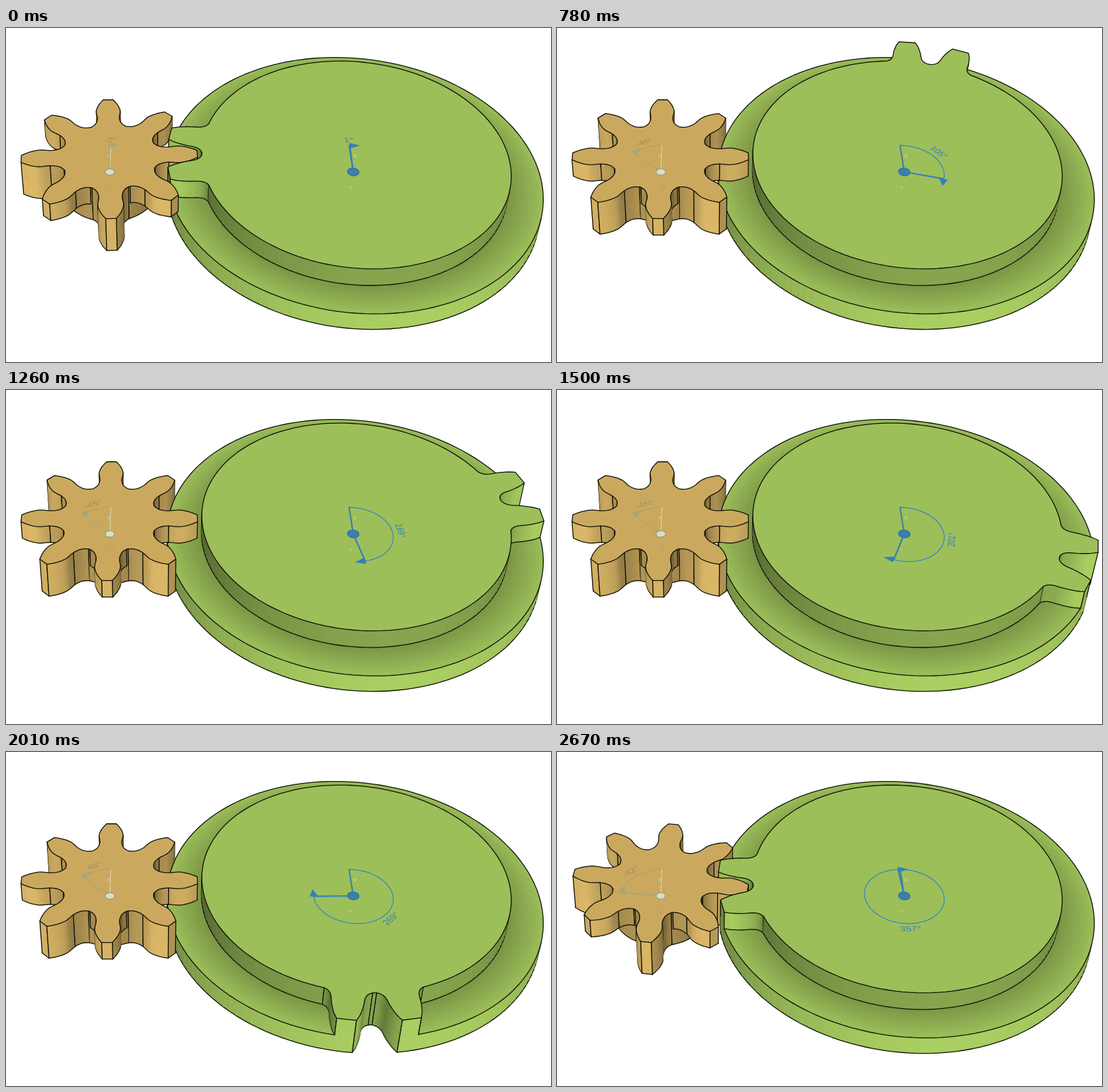
Animation, 824 px wide and 506 px high, one loop 2.7 s. Source, as an HTML page with a canvas:

```html
<!DOCTYPE html>
<html lang="en">
<head>
<meta charset="utf-8">
<title>Intermittent gear</title>
<style>
  html, body { margin: 0; width: 100%; height: 100%; overflow: hidden; background: #fff; }
  canvas { display: block; }
</style>
</head>
<body>
<canvas id="stage" width="824" height="506"></canvas>
<script>
const ctx = document.getElementById('stage').getContext('2d');
const RAD = Math.PI / 180;
const STEP = 30, STEPS = 90;
const BOTTOM = -31.5, LEDGE = -1.5, TOP = 30;   // heights of the two gear layers
const DISC = 229.5, RIM = 281.5, ROOT = 72.5;
const PINION_X = -71, WHEEL_X = 297;
const TAN = [202, 169, 95], GREEN = [157, 191, 90];
const INK = '#0b0d06';

// Perspective camera looking down; x right, y away, z up.
function project(x, y, z) {
  const w = 1 + 0.00036 * y - 0.00032 * z;
  return [228 + x / w, 218 - (0.683 * y + 0.78 * z) / w];
}

// Tooth flanks from tip to root: [degrees from tooth centre, radius, sharp edge]
const WHEEL_FLANK = [[2.7, RIM, 1], [3.6, 273], [4.35, 263], [5, 252], [5.4, 243],
  [6, 236.5], [7, 232], [8.3, DISC, 1]];
const PINION_FLANK = [[3.3, 132, 1], [6.2, 123], [8.6, 114], [10.1, 106], [10.5, 98],
  [10.8, 90, 1], [12.8, 81.5], [16.4, 75.5], [21.5, ROOT, 1]];

// Catmull-Rom subdivision
function smooth(points, n = 3) {
  const out = [];
  for (let i = 0; i < points.length - 1; i++) {
    const [p0, p1, p2, p3] = [-1, 0, 1, 2].map(k => points[Math.min(points.length - 1, Math.max(0, i + k))]);
    for (let j = 0; j < n; j++) {
      const t = j / n;
      const at = k => p1[k] + 0.5 * t * (p2[k] - p0[k] +
        t * (2 * p0[k] - 5 * p1[k] + 4 * p2[k] - p3[k] + t * (3 * (p1[k] - p2[k]) + p3[k] - p0[k])));
      out.push([at(0), at(1), j === 0 && p1[2]]);
    }
  }
  out.push(points[points.length - 1]);
  return out;
}

// "line" marks vertices whose wall has a visible lower edge on the upper layer.
function flank(points, centre, side, line) {
  const list = smooth(points).map(([a, r, edge]) => ({ a: centre + side * a, r, edge, line }));
  return side < 0 ? list.reverse() : list;
}

function arc(r, from, to, line) {
  const n = Math.ceil((to - from) / 2.5);
  return Array.from({ length: n + 1 }, (_, i) => ({ a: from + (to - from) * i / n, r, line }));
}

function tooth(points, centre, line) {
  return [...flank(points, centre, -1, line), ...flank(points, centre, 1, line)];
}

const pinionTop = [], pinionBase = [];
for (let k = 0; k < 4; k++) {
  const thick = tooth(PINION_FLANK, k * 90, false);
  pinionTop.push(...thick, ...tooth(PINION_FLANK, k * 90 + 45, true));
  pinionBase.push(...thick, ...arc(ROOT, k * 90 + 22, k * 90 + 68));
}
const notch = [...flank(WHEEL_FLANK, -9, 1), ...flank(WHEEL_FLANK, 9, -1)];
const wheelTop = [...notch, ...flank(WHEEL_FLANK, 9, 1, true),
  ...arc(DISC, 17.5, 342.5, true), ...flank(WHEEL_FLANK, 351, -1, true)];
const wheelBase = [...notch, ...arc(RIM, 6.4, 353.6)];
const rimLine = arc(RIM, 11.7, 348.3);

function place(verts, x, turn) {
  return verts.map(v => ({
    ...v,
    x: x + v.r * Math.cos((v.a + turn) * RAD),
    y: v.r * Math.sin((v.a + turn) * RAD)
  }));
}

function trace(points, close) {
  ctx.beginPath();
  points.forEach(p => ctx.lineTo(...p));
  if (close) ctx.closePath();
}

function strokeLine(points, color = INK, width = 1.3) {
  trace(points);
  ctx.strokeStyle = color;
  ctx.lineWidth = width;
  ctx.stroke();
}

const rgb = (color, k) => `rgb(${color.map(c => Math.round(c * k))})`;

function wallsOf(solid, low, high) {
  const { verts, color, light, root } = solid;
  const walls = verts.map((a, i) => {
    const b = verts[(i + 1) % verts.length];
    const quad = [project(a.x, a.y, high), project(b.x, b.y, high), project(b.x, b.y, low), project(a.x, a.y, low)];
    const [p, q, , s] = quad;
    const facing = (q[0] - p[0]) * (s[1] - p[1]) - (q[1] - p[1]) * (s[0] - p[0]) > 0;
    const dx = b.x - a.x, dy = b.y - a.y;
    const lit = Math.max(0, (dy * light[0] - dx * light[1]) / (Math.hypot(dx, dy) || 1));
    const depth = Math.min(1, Math.max(0, ((a.r + b.r) / 2 - root) / 40));
    return { a, b, quad, facing, y: (a.y + b.y) / 2,
      fill: rgb(color, (0.68 + 0.4 * lit) * (0.8 + 0.2 * depth)) };
  });
  walls.forEach((w, i) => {
    w.startEdge = w.a.edge || !walls[(i || walls.length) - 1].facing;
    w.endEdge = w.b.edge || !walls[(i + 1) % walls.length].facing;
    w.lowEdge = low === BOTTOM || (w.a.line && w.b.line);
  });
  return walls.filter(w => w.facing);
}

function paintWalls(solids, low, high) {
  const walls = solids.flatMap(s => wallsOf(s, low, high)).sort((a, b) => b.y - a.y);
  for (const { quad, fill, startEdge, endEdge, lowEdge } of walls) {
    const [p, q, r, s] = quad;
    trace(quad, true);
    ctx.fillStyle = ctx.strokeStyle = fill;
    ctx.lineWidth = 0.7;
    ctx.fill();
    ctx.stroke();
    if (lowEdge) strokeLine([s, r]);
    if (startEdge) strokeLine([p, s]);
    if (endEdge) strokeLine([q, r]);
  }
}

function paintCap({ verts, color }, z, tone = 1) {
  trace(verts.map(v => project(v.x, v.y, z)), true);
  ctx.fillStyle = rgb(color, tone);
  ctx.fill();
}

const circle = (x, r, from = 0, to = 360) =>
  place(arc(r, from, to), x, 0).map(v => project(v.x, v.y, 0));

// Soft contact shadow on the rim around the raised disc
function shadeRim() {
  ctx.save();
  ctx.clip();
  ctx.fillStyle = 'rgba(20,30,0,.025)';
  for (let r = 235; r < 278; r += 5) {
    trace(circle(WHEEL_X, r), true);
    ctx.fill();
  }
  ctx.restore();
}

function dot(x, y, color) {
  ctx.beginPath();
  ctx.arc(x, y, 3.6, 0, 7);
  ctx.fillStyle = color;
  ctx.fill();
  ctx.strokeStyle = 'rgba(120,140,70,.25)';
  ctx.lineWidth = 1;
  ctx.stroke();
}

// Joint gauge: fixed pole, swept arc, flag and angle; "angle" is clockwise.
function gauge(x, angle, style) {
  const heading = 90 - angle;
  const at = (r, deg, side = 0) => project(
    x + r * Math.cos(deg * RAD) + side * Math.sin(deg * RAD),
    r * Math.sin(deg * RAD) - side * Math.cos(deg * RAD), 0);
  strokeLine(circle(x, 60, Math.min(90, heading), Math.max(90, heading)), style.arc, 1.2);
  strokeLine([at(0, 0), at(60, 90)], style.pole, style.poleWidth);
  strokeLine([at(0, 0), at(60, heading)], style.flag, style.flagWidth);
  trace([at(53, heading), at(66, heading), at(60, heading, 16)], true);
  ctx.fillStyle = style.flag;
  ctx.fill();

  trace(circle(x, style.hubSize), true);
  ctx.fillStyle = style.hub;
  ctx.fill();
  ctx.strokeStyle = style.hubLine;
  ctx.lineWidth = 1.5;
  ctx.stroke();

  const mid = 90 - angle / 2;
  const flip = Math.sin(mid * RAD) < 0 ? -1 : 1;
  const o = at(72, mid), right = at(72, mid, flip), down = at(72 - flip, mid);
  ctx.save();
  ctx.setTransform(right[0] - o[0], right[1] - o[1], down[0] - o[0], down[1] - o[1], o[0], o[1]);
  ctx.font = '15px "Liberation Sans", Arial, sans-serif';
  ctx.textAlign = 'center';
  ctx.textBaseline = 'middle';
  ctx.fillStyle = style.text;
  ctx.fillText(Math.round(angle) + '°', 0, 0);
  ctx.restore();
}

const BLUE = { arc: '#2a82c8', pole: '#3a7ba4', poleWidth: 2, flag: '#347fb9', flagWidth: 2.2,
  hub: '#3d7fa8', hubLine: '#2f76ae', hubSize: 8.5, text: '#2f80b8' };
const PALE = { arc: 'rgba(130,145,110,.35)', pole: 'rgba(232,222,185,.8)', poleWidth: 1.1,
  flag: 'rgba(145,165,140,.6)', flagWidth: 1.6,
  hub: '#dfdcc4', hubLine: 'rgba(135,155,135,.75)', hubSize: 7, text: 'rgba(115,120,85,.55)' };

function pinionAngle(turn) {
  if (turn < 18) return 2.5 * turn;
  return turn > 342 ? 90 - 2.5 * (360 - turn) : 45;
}

function draw(now) {
  const turn = 1 + 4 * (Math.floor(now / STEP) % STEPS);
  const spin = pinionAngle(turn), wheelSpin = 179.5 - turn;
  const pinion = verts => ({ verts: place(verts, PINION_X, spin), color: TAN, light: [-0.3, -0.95], root: ROOT });
  const wheel = verts => ({ verts: place(verts, WHEEL_X, wheelSpin), color: GREEN, light: [0.15, -0.99], root: DISC });

  ctx.fillStyle = '#fff';
  ctx.fillRect(0, 0, 824, 506);
  ctx.lineJoin = ctx.lineCap = 'round';

  const base = [pinion(pinionBase), wheel(wheelBase)];
  paintWalls(base, BOTTOM, LEDGE);
  paintCap(base[0], LEDGE, 0.8);
  paintCap(base[1], LEDGE, 0.98);
  shadeRim();
  strokeLine(place(rimLine, WHEEL_X, wheelSpin).map(v => project(v.x, v.y, LEDGE)));

  const top = [pinion(pinionTop), wheel(wheelTop)];
  paintWalls(top, LEDGE, TOP);
  for (const solid of top) {
    paintCap(solid, TOP);
    ctx.strokeStyle = INK;
    ctx.lineWidth = 1.3;
    ctx.stroke();
  }

  dot(527.5, 193.5, 'rgba(190,208,125,.6)');
  dot(521, 241.5, 'rgba(178,205,100,.6)');
  dot(156, 193.5, 'rgba(200,200,150,.6)');
  dot(158.5, 241.5, 'rgba(214,165,100,.6)');
  gauge(PINION_X, -spin, PALE);
  gauge(WHEEL_X, turn, BLUE);
}

const start = performance.now();
function loop() {
  draw(performance.now() - start);
  requestAnimationFrame(loop);
}
loop();
</script>
</body>
</html>
```
